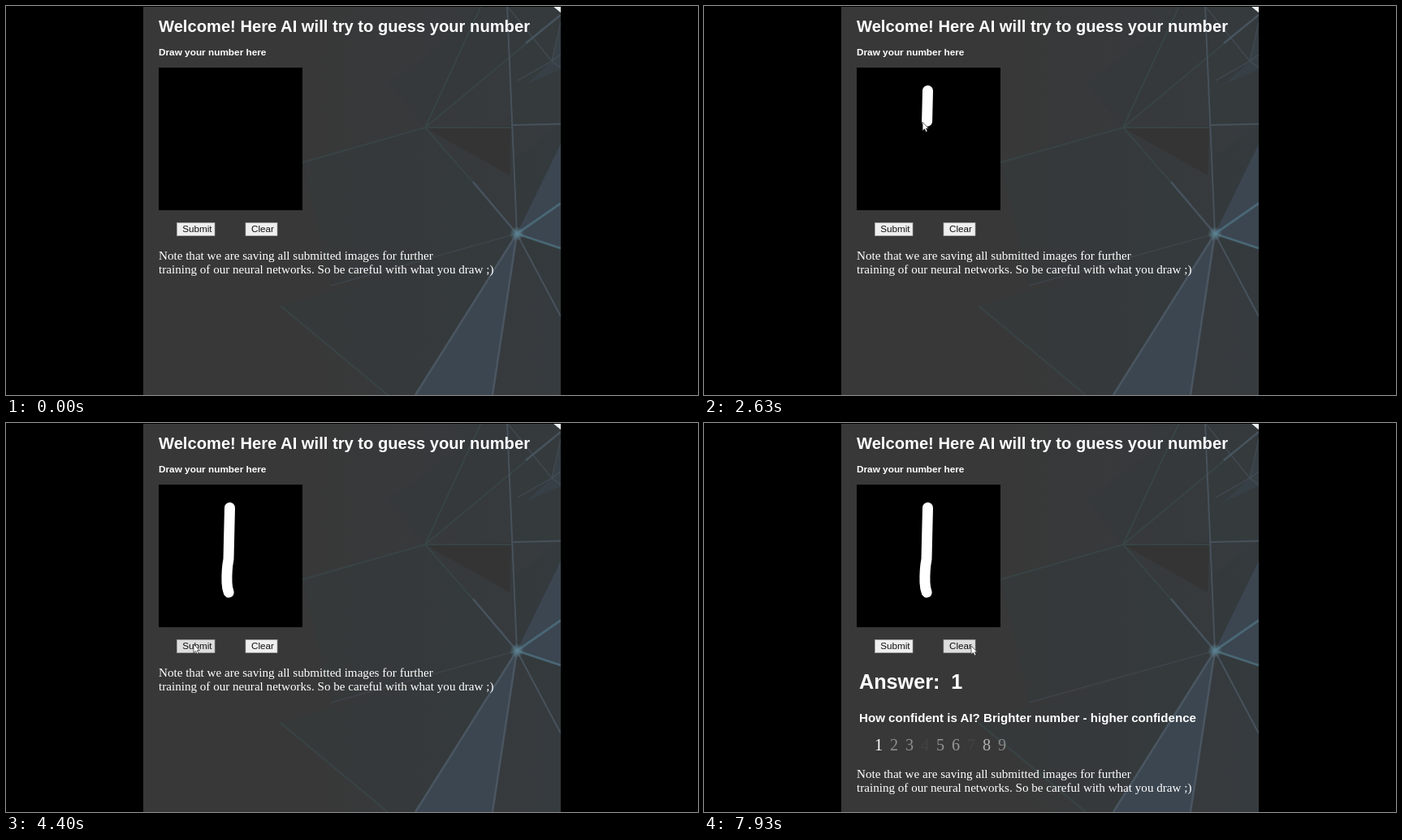
An HTML page that plays this animation: 852 px wide and 480 px high, repeating every 8000 ms.

```html
<!DOCTYPE html>
<html lang="en">
<head>
<meta charset="utf-8">
<title>Guess your number</title>
<style>
html, body { margin: 0; width: 100%; height: 100%; overflow: hidden; background: #000; }
svg { display: block; width: 852px; height: 480px; }
text { white-space: pre; fill: #fff; }
.sans { font-family: "Liberation Sans", Arial, sans-serif; }
.bold { font-weight: bold; }
.serif { font-family: "Liberation Serif", "Times New Roman", serif; font-size: 15.12px; }
.digits text { font-size: 20.16px; }
.button rect { fill: #efefef; stroke: #a5a5a5; stroke-width: .7; }
.button.hover rect { fill: #dedede; }
.button text { fill: #111; font-size: 11.7px; }
</style>
</head>
<body>
<svg viewBox="0 0 852 480">
  <defs>
    <clipPath id="panel"><rect x="169" y="1" width="514" height="479"/></clipPath>
    <linearGradient id="wall"><stop offset=".4" stop-color="#383838"/><stop offset="1" stop-color="#363b3f"/></linearGradient>
    <radialGradient id="glow"><stop stop-color="#5d8494"/><stop offset="1" stop-color="#5d8494" stop-opacity="0"/></radialGradient>
  </defs>
  <rect width="852" height="480"/>
  <g clip-path="url(#panel)">
    <rect x="169" width="514" height="480" fill="url(#wall)"/>
    <g id="facets"></g>
    <g id="threads" fill="none"></g>
    <circle cx="629" cy="281" r="9" fill="url(#glow)"/>
    <path d="M673 0H684V9Z" fill="#eef2f4"/>
  </g>

  <g class="sans bold">
    <text x="188" y="32" font-size="20.16">Welcome! Here AI will try to guess your number</text>
    <text x="188" y="61" font-size="11.8">Draw your number here</text>
  </g>
  <rect x="188" y="76" width="177" height="176"/>
  <path id="ink" d="M275.5 104.5L274.6 142L274 168Q271.5 181 272 197Q272.3 204 274.2 209"
        pathLength="1" fill="none" stroke="#fff" stroke-width="13" stroke-linecap="round" stroke-linejoin="round"/>

  <g class="button sans" id="submit"><rect x="210.5" y="267.5" width="46.5" height="16"/><text x="217.2" y="279">Submit</text></g>
  <g class="button sans" id="clear"><rect x="295" y="267.5" width="39" height="16"/><text x="302" y="279">Clear</text></g>

  <g id="result">
    <g class="sans bold">
      <text x="191" y="328" font-size="25.2">Answer:  1</text>
      <text x="191" y="368.5" font-size="15.12">How confident is AI? Brighter number - higher confidence</text>
    </g>
    <g id="digits" class="serif digits"></g>
  </g>
  <g id="note" class="serif">
    <text x="188" y="313">Note that we are saving all submitted images for further</text>
    <text x="188" y="330">training of our neural networks. So be careful with what you draw ;)</text>
  </g>
  <path id="cursor" d="M0 0V10.6L2.5 8.4L4.2 12L6 11.2L4.4 7.7H7.4Z" fill="#fff" stroke="#222" stroke-width=".7"/>
</svg>
<script>
const LOOP = 8000, ENTER_AT = 1600, DRAW_START = 2270, DRAW_END = 3270, ANSWER_AT = 5000;
const $ = id => document.getElementById(id);

function add(parent, tag, attrs, text = '') {
  const node = document.createElementNS('http://www.w3.org/2000/svg', tag);
  for (const name in attrs) node.setAttribute(name, attrs[name]);
  node.textContent = text;
  $(parent).append(node);
}

const SHADE = '#343a3d', BLUE = '#3b4651', DARK = '#353434';
const FAINT = '#394546', SLATE = '#4a5661', TEAL = '#4a6775';
[
  ['M470 95L530 52L585 0H683V12L516 150Z', SHADE, .6],
  ['M516 150L622 147L619 60L683 12V146Z', SHADE, .5],
  ['M516 150L365 193L400 345L629 281Z', SHADE, .4],
  ['M516 150L622 148L620 209Z', DARK, .9],
  ['M629 281L338 370L470 480H504Z', SHADE, .4],
  ['M629 281L683 383V299Z', SHADE, .8],
  ['M629 281L624 190L683 146V170Z', SHADE, .7],
  ['M672 68L683 25V78L640 97Z', BLUE, .5],
  ['M629 281L683 170V299Z', BLUE, 1],
  ['M629 281L504 480H599Z', BLUE, 1]
].forEach(([d, fill, opacity]) => add('facets', 'path', { d, fill, opacity }));

[
  ['M516 150L585 0M516 150L672 20M365 193L516 150H622M516 150L578 221M338 370L470 480', FAINT, 2, .9],
  ['M629 281L400 345', SLATE, 1.5, .4],
  ['M629 281L617 0M622 147L683 145.5M629 281L683 383', SLATE, 2, .85],
  ['M575 217L629 281M640 46L683 11', SLATE, 2.5, .9],
  ['M617 0L672 68L683 60M630 92L672 68L683 76M672 68L683 20', SLATE, 1.3, .6],
  ['M629 281L504 480M629 281L599 480', SLATE, 2.5, 1],
  ['M629 281L683 243.5M629 281L683 299', TEAL, 2.8, 1]
].forEach(([d, stroke, width, opacity]) =>
  add('threads', 'path', { d, stroke, 'stroke-width': width, opacity }));

[1, .43, .43, .05, .46, .48, .05, .6, .4].forEach((opacity, i) =>
  add('digits', 'text', { x: 210 + 19 * i, y: 403.5, opacity }, i + 1));

// Each step is [time, value, ...]; values between steps are eased.
function track(steps, t) {
  const next = steps.findIndex(step => step[0] > t);
  if (next < 0) return steps.at(-1).slice(1);
  if (next === 0) return steps[0].slice(1);
  const a = steps[next - 1], b = steps[next];
  const u = (t - a[0]) / (b[0] - a[0]), k = u * u * (3 - 2 * u);
  return a.slice(1).map((v, i) => v + (b[i + 1] - v) * k);
}

const approach = [[ENTER_AT, 300, 480], [2100, 270, 105.5]];
const leave = [[DRAW_END, 268.7, 210], [3600, 237, 244], [4250, 231, 273],
  [6500, 231, 273], [7350, 329, 275]];

const ink = $('ink'), inkLength = ink.getTotalLength();

function showHover(id, x, y, left, right) {
  $(id).classList.toggle('hover', x >= left && x <= right && y >= 267 && y <= 284);
}

function draw(t) {
  const drawn = Math.min(1, Math.max(0, (t - DRAW_START) / (DRAW_END - DRAW_START)));
  ink.style.display = drawn ? '' : 'none';
  ink.setAttribute('stroke-dasharray', drawn < 1 ? `${drawn} 2` : 'none');

  let [x, y] = track(t < DRAW_START ? approach : leave, t);
  if (drawn > 0 && drawn < 1) {
    const tip = ink.getPointAtLength(drawn * inkLength);
    x = tip.x - 5.5;
    y = tip.y + 1;
  }
  $('cursor').style.display = t < ENTER_AT ? 'none' : '';
  $('cursor').setAttribute('transform', `translate(${x} ${y})`);
  showHover('submit', x, y, 210, 257);
  showHover('clear', x, y, 295, 334);

  const answered = t >= ANSWER_AT;
  $('result').style.display = answered ? '' : 'none';
  $('note').setAttribute('transform', `translate(0 ${answered ? 124.5 : 0})`);
}

const start = performance.now();
function tick() {
  draw((performance.now() - start) % LOOP);
  requestAnimationFrame(tick);
}
tick();
</script>
</body>
</html>
```
